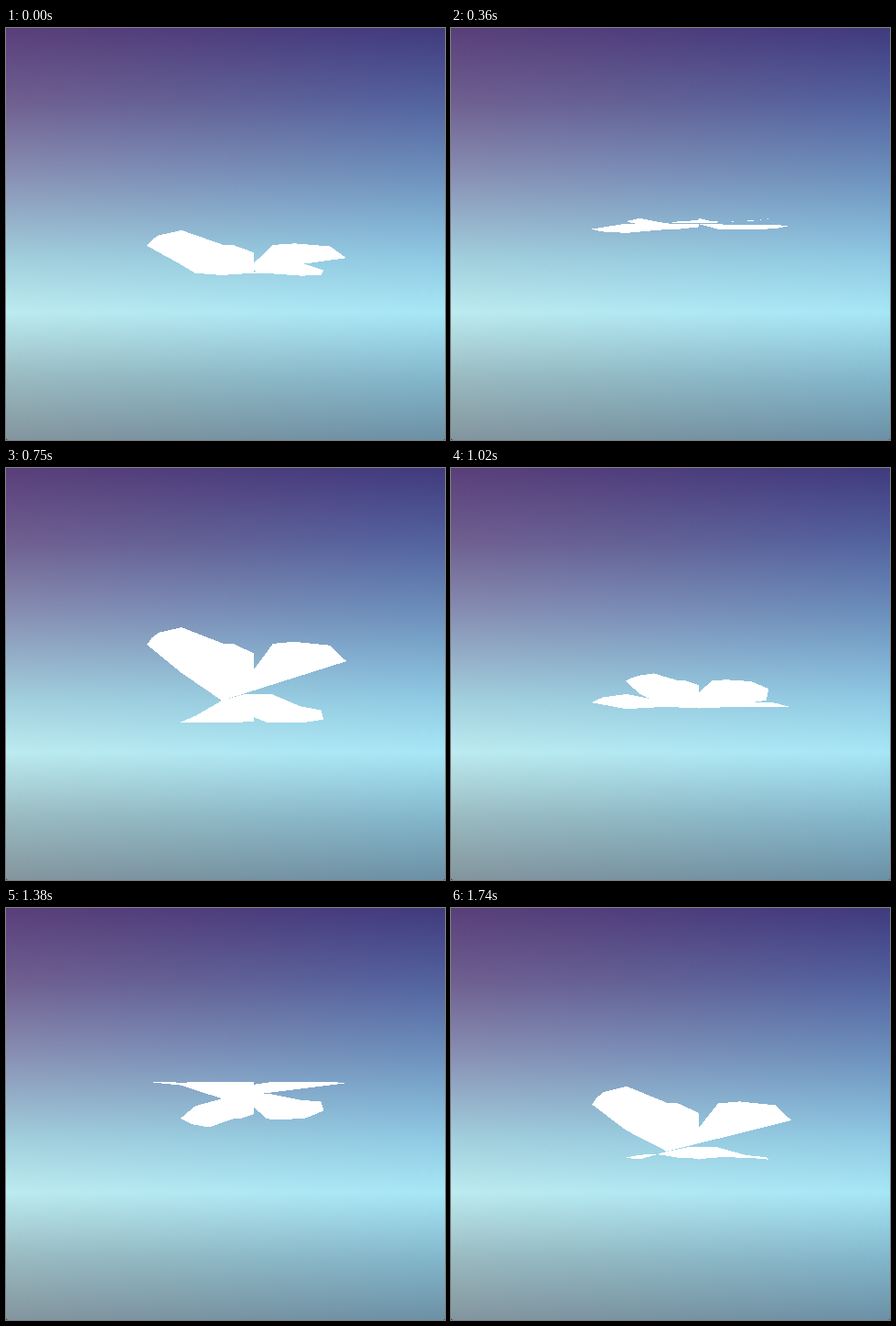
Write an HTML page that moves like this. It is 480 px wide and 450 px high and loops after 1.77 s.

```html
<!DOCTYPE html>
<html lang="en">
<head>
<meta charset="utf-8">
<title>Flapping wings</title>
<style>
  html, body { margin: 0; width: 100%; height: 100%; overflow: hidden; background: #3b4652; }
  svg { display: block; width: 480px; height: 450px; }
</style>
</head>
<body>
<svg viewBox="0 0 480 450">
  <defs>
    <linearGradient id="warm" x2="0" y2="1">
      <stop offset="0" stop-color="#5a3f7a"/>
      <stop offset=".18" stop-color="#706090"/>
      <stop offset=".35" stop-color="#888eb3"/>
      <stop offset=".56" stop-color="#a2cfdc"/>
      <stop offset=".69" stop-color="#bcebf0"/>
      <stop offset=".85" stop-color="#9abac0"/>
      <stop offset="1" stop-color="#84959e"/>
    </linearGradient>
    <linearGradient id="cool" x2="0" y2="1">
      <stop offset="0" stop-color="#403a7e"/>
      <stop offset=".18" stop-color="#52639f"/>
      <stop offset=".35" stop-color="#6b8fbc"/>
      <stop offset=".56" stop-color="#8fc9e3"/>
      <stop offset=".69" stop-color="#a6e6f6"/>
      <stop offset=".85" stop-color="#82b6cb"/>
      <stop offset="1" stop-color="#6b90a5"/>
    </linearGradient>
    <linearGradient id="fade">
      <stop offset="0" stop-color="#000"/>
      <stop offset="1" stop-color="#fff"/>
    </linearGradient>
    <mask id="toRight"><rect width="480" height="450" fill="url(#fade)"/></mask>
  </defs>
  <rect width="480" height="450" rx="3" fill="url(#warm)"/>
  <rect width="480" height="450" rx="3" fill="url(#cool)" mask="url(#toRight)"/>
  <g fill="#fff" shape-rendering="crispEdges">
    <polygon id="near"/>
    <polygon id="far"/>
  </g>
</svg>
<script>
const LOOP = 1770, STEP = 30, PERIOD = 912;
const rad = degrees => degrees * Math.PI / 180;

// Where the view converges, and how the wave runs through the wings.
const EYE_X = 271, EYE_Y = 302;
const BODY_HEIGHT = 63, LIFT = 40;
const SWING = 31, SPREAD = 1.25;
const START = rad(3), LAG = rad(325);

// One wing seen from above: [along the body, out from the body].
const wing = [
  [-35, 0], [-71, .105], [-95, .187], [-89, .205], [-81, .22], [-60.5, .234],
  [-27, .19], [-18.5, .19], [0, .163], [0, .115],
  [17, .19], [36, .195], [68, .185], [87, .14]
];
// The far wing has a fuller trailing edge.
const trailing = [[78, .06], [53, .035], [18, -.03], [-9, -.03]];

// Perspective view of a point riding the wave; depth > 0 is nearer.
function project(along, depth, phase) {
  const scale = 1 / (1 - depth), reach = Math.abs(depth);
  const rest = EYE_Y - scale * (BODY_HEIGHT + LIFT * reach);
  const swing = SWING * Math.sqrt(scale) * (1 + SPREAD * reach);
  const y = rest + swing * Math.cos(phase - LAG * depth);
  return `${(EYE_X + along * scale).toFixed(2)},${y.toFixed(2)}`;
}

const sides = [
  { shape: document.getElementById("near"), corners: wing, side: 1 },
  { shape: document.getElementById("far"), corners: [...wing, ...trailing], side: -1 }
];

function draw(time) {
  const shown = Math.floor((time % LOOP) / STEP) * STEP;
  const phase = START + shown / PERIOD * 2 * Math.PI;
  for (const { shape, corners, side } of sides) {
    const points = corners.map(([along, out]) => project(along, side * out, phase));
    shape.setAttribute("points", points.join(" "));
  }
}

const begin = performance.now();
function tick() {
  draw(performance.now() - begin);
  requestAnimationFrame(tick);
}
tick();
</script>
</body>
</html>
```
